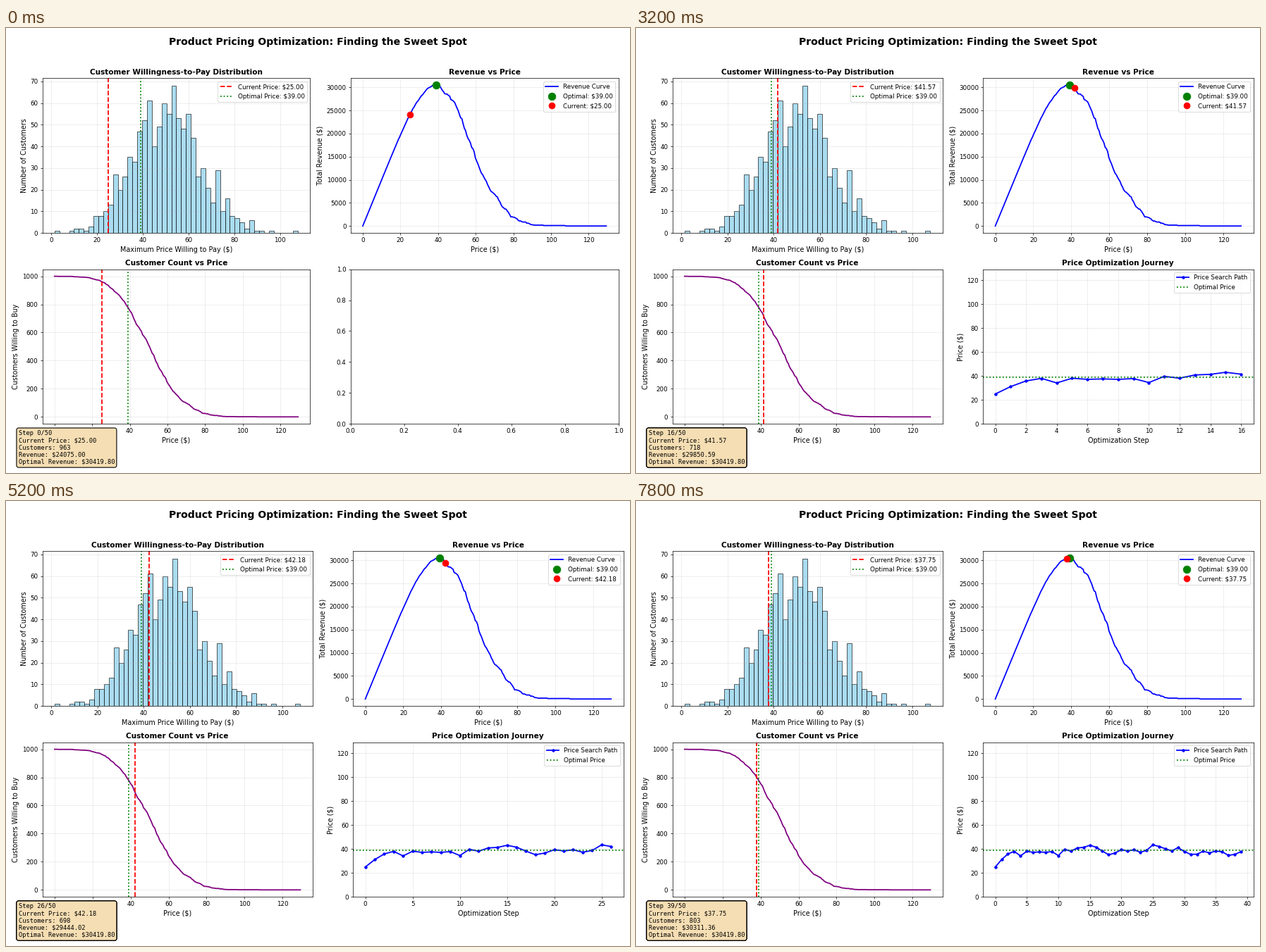
These frames come from a looping animation (885x632 px, 8000 ms). A matplotlib script:

```python
import numpy as np
import matplotlib.pyplot as plt
from matplotlib.animation import FuncAnimation

W, H, DPI = 885, 632, 63.2
FRAMES, STEPS = 40, 50

np.random.seed(42)
wtp = np.random.normal(50, 15, 1000)
prices = np.linspace(0, wtp.max() * 1.2, 200)


def buyers(price):
    return int(np.sum(wtp >= price))


counts = np.array([buyers(p) for p in prices])
revenue = prices * counts
best = int(np.argmax(revenue))
best_price, best_revenue = prices[best], revenue[best]

# Noisy hill climb: fixed step along the local slope, noise fading out
path = [25.0]
for k in range(FRAMES - 1):
    p = path[-1]
    i = np.searchsorted(prices, p)
    step = 2 if revenue[i] > revenue[i - 1] else -2
    path.append(p + step + np.random.normal(0, 3 * (1 - k / STEPS)))

fig, ((ax1, ax2), (ax3, ax4)) = plt.subplots(
    2, 2, figsize=((W + 0.01) / DPI, (H + 0.01) / DPI), dpi=DPI)
fig.suptitle("Product Pricing Optimization: Finding the Sweet Spot",
             fontsize=16, fontweight="bold")


def dress(ax, title, xlabel, ylabel):
    ax.set_title(title, fontsize=12, fontweight="bold")
    ax.set_xlabel(xlabel, fontsize=11)
    ax.set_ylabel(ylabel, fontsize=11)
    ax.grid(True, alpha=0.3)


def price_lines(ax):
    now = ax.axvline(path[0], color="red", ls="--", lw=2)
    opt = ax.axvline(best_price, color="green", ls=":", lw=2,
                     label=f"Optimal Price: ${best_price:.2f}")
    return now, opt


ax1.hist(wtp, bins=50, color="skyblue", alpha=0.7, edgecolor="black")
now1, opt1 = price_lines(ax1)
dress(ax1, "Customer Willingness-to-Pay Distribution",
      "Maximum Price Willing to Pay ($)", "Number of Customers")

curve, = ax2.plot(prices, revenue, "b-", lw=2, label="Revenue Curve")
peak, = ax2.plot(best_price, best_revenue, "go", ms=12,
                 label=f"Optimal: ${best_price:.2f}")
dot, = ax2.plot(path[0], path[0] * buyers(path[0]), "ro", ms=10)
dress(ax2, "Revenue vs Price", "Price ($)", "Total Revenue ($)")

ax3.plot(prices, counts, color="purple", lw=2)
now3, _ = price_lines(ax3)
dress(ax3, "Customer Count vs Price", "Price ($)", "Customers Willing to Buy")

# Stacked copies of the box: its rim darkens as they pile up
notes = [fig.text(0.02, 0.02, "", fontsize=10, family="monospace",
                  bbox=dict(boxstyle="round", facecolor="wheat"))
         for _ in range(8)]


def journey(k):
    ax4.clear()
    if k == 0:
        return
    ax4.plot(range(k + 1), path[:k + 1], "bo-", lw=2, ms=4,
             label="Price Search Path")
    ax4.axhline(best_price, color="green", ls=":", lw=2, label="Optimal Price")
    ax4.set_ylim(0, prices[-1])
    dress(ax4, "Price Optimization Journey", "Optimization Step", "Price ($)")
    ax4.legend(loc="upper right")


def update(k):
    p = path[k]
    n = buyers(p)
    for line in (now1, now3):
        line.set_xdata([p, p])
    now1.set_label(f"Current Price: ${p:.2f}")
    ax1.legend(handles=[now1, opt1], loc="upper right")
    dot.set_data([p], [p * n])
    dot.set_label(f"Current: ${p:.2f}")
    ax2.legend(handles=[curve, peak, dot], loc="upper right")
    journey(k)
    info = (f"Step {k}/{STEPS}\nCurrent Price: ${p:.2f}\nCustomers: {n}\n"
            f"Revenue: ${p * n:.2f}\nOptimal Revenue: ${best_revenue:.2f}")
    for j, note in enumerate(notes):
        note.set_text(info)
        note.set_visible(j < k + 2)
    fig.tight_layout(rect=[0, 0.05, 1, 0.96])
    return []


def start():
    update(0)
    return []


anim = FuncAnimation(fig, update, frames=FRAMES, init_func=start,
                     interval=200, repeat=True, repeat_delay=0, blit=False)
plt.show()
```
